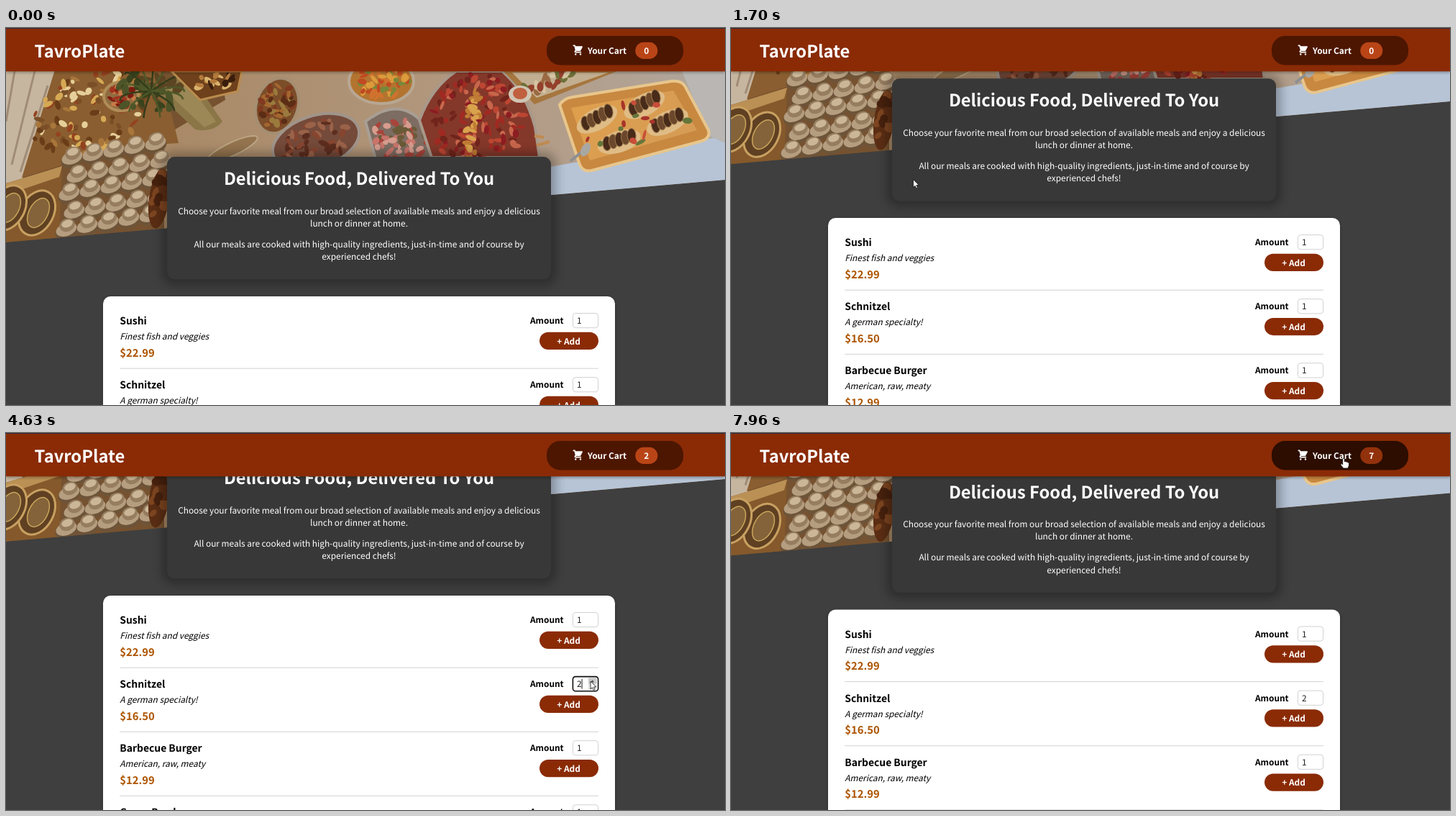
An HTML page for the animation above (8000 ms loop, 1000x524 px).

```html
<!DOCTYPE html>
<html lang="en">
<head>
<meta charset="utf-8">
<title>Meal order</title>
<style>
  html, body { margin: 0; width: 100%; height: 100%; overflow: hidden; background: #3f3f3f; }
  svg { display: block; width: 1000px; height: 524px; }
  text { font-family: "Noto Sans CJK JP", "Noto Sans CJK SC", "Noto Sans CJK", "Noto Sans", sans-serif; font-size: 11.867px; white-space: pre; text-rendering: geometricPrecision; }
  .b { font-weight: 700; }
  .i { font-style: italic; }
  .m { text-anchor: middle; }
  .h1 { font-size: 23.73px; }
  .h3 { font-size: 13.88px; }
  .price { font-size: 14.83px; }
</style>
</head>
<body>
<svg id="stage" viewBox="0 0 1000 524" xmlns="http://www.w3.org/2000/svg">
  <defs>
    <clipPath id="slant"><path d="M0 0H1000V211L0 297.8Z"/></clipPath>
    <filter id="soft" x="-20%" y="-30%" width="140%" height="160%"><feGaussianBlur stdDeviation="6.7"/></filter>
    <filter id="thin" x="-5%" y="-5%" width="110%" height="110%"><feGaussianBlur stdDeviation="2"/></filter>
    <linearGradient id="cloth"><stop offset="0" stop-color="#a98966"/><stop offset=".6" stop-color="#b39a82"/><stop offset="1" stop-color="#b0a79f"/></linearGradient>
    <linearGradient id="gold" x2="1" y2=".4"><stop offset="0" stop-color="#e0a04c"/><stop offset="1" stop-color="#d69c55"/></linearGradient>
  </defs>
</svg>
<script>
const LOOP = 8000, CARD_Y = 372.9, PITCH = 89.1;
const BROWN = '#8a2b06';
const stage = document.getElementById('stage');

function set(node, attrs) {
  for (const k in attrs) node.setAttribute(k, attrs[k]);
  return node;
}
function add(parent, tag, attrs) {
  return parent.appendChild(set(document.createElementNS('http://www.w3.org/2000/svg', tag), attrs));
}
const group = (p, attrs = {}) => add(p, 'g', attrs);
const rect = (p, x, y, width, height, fill, rx = 0, more = {}) => add(p, 'rect', { x, y, width, height, fill, rx, ...more });
const shape = (p, d, fill, more = {}) => add(p, 'path', { d, fill, ...more });
function oval(p, cx, cy, rx, ry, turn, fill, more = {}) {
  return add(p, 'ellipse', { cx, cy, rx, ry, fill, transform: `rotate(${turn} ${cx} ${cy})`, ...more });
}
function label(p, str, x, y, cls, fill) {
  const node = add(p, 'text', { x, y, class: cls, fill });
  node.textContent = str;
  return node;
}

let seed = 7;
function rnd() {
  seed = (seed * 16807) % 2147483647;
  return seed / 2147483647;
}
function scatter(p, cx, cy, rx, ry, turn, n, size, colors) {
  const g = group(p, { transform: `rotate(${turn} ${cx} ${cy})` });
  for (let i = 0; i < n; i++) {
    const a = rnd() * 6.283, r = Math.sqrt(rnd());
    oval(g, cx + rx * r * Math.cos(a), cy + ry * r * Math.sin(a),
      size * (0.6 + rnd()), size * (0.4 + rnd() * 0.5), rnd() * 180, colors[i % colors.length]);
  }
}
function dish(p, cx, cy, rx, ry, turn, fill, rim, bits, n) {
  oval(p, cx, cy, rx, ry, turn, fill, { stroke: rim, 'stroke-width': 4 });
  scatter(p, cx, cy, rx * 0.8, ry * 0.78, turn, n, 5, bits);
}

// Buffet picture
function drawBuffet(p) {
  const g = group(p, { 'clip-path': 'url(#slant)' });
  rect(g, 0, 0, 1000, 300, '#765230');
  shape(g, 'M290 0H1000V211L220 279V150L305 100Z', 'url(#cloth)');
  shape(g, 'M740 196L1000 150V212L740 236Z', '#b6c4d6');
  shape(g, 'M940 60H1000V160L978 150Z', '#b9b6b4');
  shape(g, 'M0 55H76L22 212L0 216Z', '#c6b6a0');
  shape(g, 'M12 60L0 130M40 60L8 190M58 80L20 200', 'none', { stroke: '#a08c76', 'stroke-width': 3 });

  shape(g, 'M68 58H215L240 160L160 165L22 208Z', '#8a5e30');
  scatter(g, 120, 118, 88, 54, -20, 120, 5, ['#d6a955', '#6a3d18', '#e6cf9a', '#a8763a', '#93421f', '#7a4f27']);
  dish(g, 160, 95, 24, 20, 0, '#8f6c40', '#b08c58', ['#a0341f', '#c97a48', '#7c1c10'], 22);

  shape(g, 'M0 216L78 192L74 292L0 299Z', '#85592b');
  shape(g, 'M0 216L78 192L74 207L0 232Z', '#bb9055');
  for (const [x, y] of [[43, 257], [3, 250]]) {
    oval(g, x, y, 23, 33, 28, '#5f4022', { stroke: '#c8a061', 'stroke-width': 3 });
    oval(g, x + 2, y, 13, 22, 28, '#84633a', { stroke: '#c9a55c', 'stroke-width': 1.5 });
  }
  for (let row = 0; row < 5; row++) {
    for (let col = 0; col < 5; col++) {
      const x = 92 + col * 29 + row % 2 * 9 - row * 2, y = 178 + row * 25 - col * 5;
      oval(g, x, y + 5, 16, 11, -20, '#6d5439');
      oval(g, x, y + 2, 15, 9, -20, '#b59d80');
      oval(g, x + 1, y - 4, 11, 9, -20, '#967d60');
      oval(g, x + 1, y - 6, 8, 5, -20, '#cbb797');
    }
  }
  oval(g, 213, 237, 14, 42, 8, '#5b2e14');
  scatter(g, 213, 237, 10, 36, 8, 12, 7, ['#7d4520', '#47210e']);

  shape(g, 'M205 86L254 62L301 130Q288 146 263 141Z', '#8a7647');
  shape(g, 'M222 88L250 72L292 130L276 138Z', '#9b8856');
  scatter(g, 198, 90, 45, 34, 0, 34, 7, ['#39431d', '#4d5328', '#5b4522']);
  for (let i = 0; i < 13; i++) {
    const a = i * 0.5 + 0.3, x = 202 + 46 * Math.cos(a), y = 88 + 38 * Math.sin(a);
    shape(g, `M202 88Q${x} ${y - 12} ${x} ${y}`, 'none', { stroke: i % 2 ? '#333c1a' : '#4f5829', 'stroke-width': 2.5 });
  }

  shape(g, 'M230 60H328L322 88L270 100Z', '#6e411c', { stroke: '#b98b4d', 'stroke-width': 3 });
  scatter(g, 292, 76, 28, 12, 0, 18, 5, ['#d9b36d', '#3a1d0c', '#b47a3c']);
  dish(g, 377, 108, 29, 39, 18, '#7c4d29', '#a58e72', ['#5b2d15', '#a4672f', '#803a1f', '#9a7a3d'], 44);
  dish(g, 522, 74, 45, 31, 0, '#b3742f', '#b8a792', ['#c04a22', '#dc9a3b', '#76893a', '#d0722f'], 60);
  dish(g, 431, 158, 62, 36, -18, '#744a3a', '#a0948a', ['#85452f', '#5c2d1e', '#9a6248'], 50);
  shape(g, 'M500 130Q545 95 578 130L604 186H515Z', '#7c6c61', { stroke: '#a89e94', 'stroke-width': 4 });
  scatter(g, 548, 156, 38, 30, 20, 60, 5, ['#c8746a', '#a8443b', '#d69c8e', '#6b5a38']);
  shape(g, 'M575 128Q592 82 626 60H690Q722 86 736 138L742 180H592Z', '#84382a', { stroke: '#a8988a', 'stroke-width': 4 });
  scatter(g, 655, 128, 66, 64, 0, 130, 5, ['#a02a22', '#bd4632', '#70241b', '#c8664c', '#8c1d22']);
  scatter(g, 649, 132, 9, 54, 4, 30, 5, ['#d9a24c', '#c07c34']);
  oval(g, 315, 168, 38, 9, -25, '#94744f', { stroke: '#bda684', 'stroke-width': 2 });

  shape(g, 'M690 58H855L735 106Z', '#a6763e');
  shape(g, 'M704 62H838L738 97Z', '#c2ae90');
  scatter(g, 752, 75, 38, 10, -14, 24, 6, ['#9b6a42', '#6e7038', '#d6c4a2', '#94402b']);
  oval(g, 715, 92, 16, 12, 0, '#d0c4b2');
  oval(g, 715, 91, 10, 8, 0, '#c0603f');
  shape(g, 'M735 150L748 152M738 163L756 158', 'none', { stroke: '#c08a50', 'stroke-width': 4 });

  shape(g, 'M770 107Q775 98 788 96L925 74Q940 72 945 82L977 142Q980 153 968 157L815 198Q803 201 798 190Z', '#c88840',
    { stroke: '#e8c68c', 'stroke-width': 4 });
  shape(g, 'M786 111L928 87L961 142L812 184Z', 'url(#gold)');
  for (const [x, y, turn] of [[822, 124, -28], [888, 104, -28], [853, 155, -18], [920, 128, -25]]) {
    oval(g, x, y + 3, 31, 15, turn, '#dfbc86');
    for (let k = -2; k < 3; k++) {
      const a = turn * Math.PI / 180;
      oval(g, x + k * 9 * Math.cos(a), y + k * 9 * Math.sin(a), 6, 10, turn + 15, k % 2 ? '#6b472c' : '#482b19',
        { stroke: '#9e7a4d', 'stroke-width': 1 });
    }
  }
  scatter(g, 878, 133, 78, 34, -14, 14, 5, ['#a8342a', '#65763a', '#c84d38']);
  shape(g, 'M785 185L806 168', 'none', { stroke: '#8d8f91', 'stroke-width': 4 });
  oval(g, 806, 169, 6, 10, 30, '#a9a7a2');
}

const page = group(stage);
drawBuffet(page);

rect(page, 216.6, 172.8, 548.8, 185, '#000', 17, { opacity: 0.27, filter: 'url(#soft)' });
rect(page, 224, 179.1, 534, 170.2, '#383838', 10.4);
label(page, 'Delicious Food, Delivered To You', 491, 218.2, 'b m h1', '#fff');
[['Choose your favorite meal from our broad selection of available meals and enjoy a delicious', 258.6],
 ['lunch or dinner at home.', 275.8],
 ['All our meals are cooked with high-quality ingredients, just-in-time and of course by', 304.8],
 ['experienced chefs!', 322]].forEach(([s, y]) => label(page, s, 491, y, 'm', '#fff'));

// Meal list, drawn from the top of its card
const list = group(page);
rect(list, 135, 1, 712, 385, '#000', 10.4, { opacity: 0.25, filter: 'url(#thin)' });
rect(list, 135, 0, 712, 385, '#fff', 10.4);
const items = [
  ['Sushi', 'Finest fish and veggies', '$22.99'],
  ['Schnitzel', 'A german specialty!', '$16.50'],
  ['Barbecue Burger', 'American, raw, meaty', '$12.99'],
  ['Green Bowl', 'Healthy...and green...', '$18.99']
].map(([name, info, price], i) => {
  const g = group(list, { transform: `translate(0 ${i * PITCH})` });
  label(g, name, 158.3, 39.3, 'b h3', '#000');
  label(g, info, 158.3, 60.2, 'i', '#000');
  label(g, price, 158.3, 83.7, 'b price', '#ad5502');
  rect(g, 158.3, 99.8, 665.5, 0.9, '#ccc');
  label(g, 'Amount', 729, 38.3, 'b', '#000');
  const box = rect(g, 788.4, 23.6, 35.2, 20.2, '#fff', 3.7, { stroke: '#ccc', 'stroke-width': 0.9 });
  const spin = group(g, { display: 'none' });
  rect(spin, 810, 25.5, 11.5, 16.5, '#e6e6e6');
  rect(spin, 810, 25.5, 11.5, 8.2, '#c9c9c9');
  shape(spin, 'M815.7 28.3L818 31.4H813.4ZM815.7 39.2L818 36.1H813.4Z', '#4a4a4a');
  const value = label(g, '1', 794, 38.3, '', '#222');
  const caret = rect(g, 800.6, 27, 0.9, 13.5, '#000', 0, { display: 'none' });
  const button = rect(g, 742, 49.8, 82, 24.3, BROWN, 12.15);
  label(g, '+ Add', 782.6, 66.7, 'b m', '#fff');
  return { box, spin, value, caret, button };
});

// Header
rect(stage, 0, 2, 1000, 60, '#000', 0, { opacity: 0.3, filter: 'url(#thin)' });
rect(stage, 0, 0, 1000, 60.3, BROWN);
rect(stage, 0, 0, 1000, 1, '#2b2941');
label(stage, 'TavroPlate', 39.6, 40.6, 'b h1', '#fff');
const cart = group(stage);
const cartBox = rect(cart, 752, 11, 190, 40.5, '#4d1601', 18.5);
shape(cart, 'M3 1a1 1 0 000 2h1.22l.305 1.222 1.368 5.472-.893.892C3.74 11.846 4.632 14 6.414 14H15a1 1 0 000-2H6.414l1-1H14a1 1 0 00.894-.553l3-6A1 1 0 0017 3H6.28l-.31-1.243A1 1 0 005 1zM16 16.5a1.5 1.5 0 11-3 0 1.5 1.5 0 013 0zM6.5 18a1.5 1.5 0 100-3 1.5 1.5 0 000 3z',
  '#fff', { transform: 'translate(786.8 22.7) scale(.84)' });
label(cart, 'Your Cart', 809, 36, 'b', '#fff');
const badge = rect(cart, 875.3, 19.8, 31, 23.2, '#b94517', 11.6);
const count = label(cart, '0', 890.8, 36, 'b m', '#fff');

// Pointers, both with the tip at 0,0
const pointer = group(stage, { stroke: '#111', 'stroke-width': 0.8, 'stroke-linejoin': 'round' });
const arrow = shape(pointer, 'M0 0V11L2.5 8.7L4.2 12.3L6 11.5L4.4 8H7.8Z', '#fff');
const hand = shape(pointer, 'M-1.3 1Q0 -1 1.3 1V5L2 4.5Q3.3 4.2 3.7 5.3Q5 4.7 5.6 5.9Q7.4 5.5 7.5 7.3V10L6 14H-.4L-4 9.2Q-4.2 7.3 -2.7 7.7L-1.3 9Z', '#fff');

const scrollTrack = [[1600, 0], [1630, 40], [1700, 108.5], [1770, 138], [1850, 147], [5840, 147], [5980, 127.5]];
const pointerTrack = [
  [1630, 253.5, 210.5], [1860, 253.5, 210.5], [2440, 780, 303], [2530, 777.5, 282.5], [3430, 777.5, 282.5],
  [3700, 818, 353], [3930, 813, 345], [4840, 813, 345], [5060, 785, 374], [5420, 785, 374],
  [5660, 820, 279.5], [5760, 820, 279.5], [6160, 784, 483], [7520, 784, 483], [7950, 852, 35]
];
const orders = [[2860, 1], [3220, 2], [5360, 4], [6430, 5], [6830, 6], [7230, 7]];
const bumpSteps = [[0, 1], [30, 0.9], [90, 1.1], [150, 1.15], [300, 1]];

// cubic-bezier(0, 0, .58, 1)
function easeOut(x) {
  let lo = 0, hi = 1;
  for (let i = 0; i < 20; i++) {
    const s = (lo + hi) / 2;
    if (1.74 * s * s - 0.74 * s * s * s < x) lo = s; else hi = s;
  }
  return lo * lo * (3 - 2 * lo);
}
const linear = x => x;
const smooth = x => x * x * (3 - 2 * x);

function at(track, t, ease) {
  if (t <= track[0][0]) return track[0].slice(1);
  for (let i = 1; i < track.length; i++) {
    const a = track[i - 1], b = track[i];
    if (t < b[0]) {
      const k = ease((t - a[0]) / (b[0] - a[0]));
      return a.slice(1).map((v, j) => v + (b[j + 1] - v) * k);
    }
  }
  return track[track.length - 1].slice(1);
}

function draw(t) {
  const [scroll] = at(scrollTrack, t, linear);
  set(page, { transform: `translate(0 ${-scroll})` });

  const k = t >= 800 && t < 1610 ? easeOut((t - 610) / 1000) : 1;
  set(list, { transform: `translate(0 ${CARD_Y + 35.6 * (1 - k)})`, opacity: k });

  const [x, y] = at(pointerTrack, t, smooth);
  const shown = t >= 1630;
  const over = (l, top, r, bottom) => shown && x >= l && x <= r && y >= top && y <= bottom;
  const onCart = over(752, 11, 942, 51.5);
  let onButton = onCart;

  items.forEach((item, i) => {
    const top = CARD_Y - scroll + i * PITCH;
    const hot = over(742, top + 49.8, 824, top + 74.1);
    const focus = i === 1 && t >= 4200 && t < 5200;
    onButton = onButton || hot;
    set(item.button, { fill: hot ? '#641e03' : BROWN });
    set(item.spin, { display: over(788, top + 23, 824, top + 44) ? 'inline' : 'none' });
    set(item.box, { stroke: focus ? '#101010' : '#ccc', 'stroke-width': focus ? 1.6 : 0.9 });
    set(item.caret, { display: focus && (t - 4200) % 1000 < 500 ? 'inline' : 'none' });
    item.value.textContent = i === 1 && t >= 4200 ? 2 : 1;
  });

  let total = 0, bump = 1;
  for (const [start, n] of orders) {
    if (t < start) break;
    total = n;
    [bump] = at(bumpSteps, t - start, easeOut);
  }
  count.textContent = total;
  set(cart, { transform: `translate(847 31.2) scale(${bump}) translate(-847 -31.2)` });
  set(cartBox, { fill: onCart ? '#2c0d00' : '#4d1601' });
  set(badge, { fill: onCart ? '#92320c' : '#b94517' });

  set(pointer, { transform: `translate(${x} ${y})`, display: shown ? 'inline' : 'none' });
  set(hand, { display: onButton ? 'inline' : 'none' });
  set(arrow, { display: onButton ? 'none' : 'inline' });
}

const begin = performance.now();
function tick() {
  draw((performance.now() - begin) % LOOP);
  requestAnimationFrame(tick);
}
tick();
</script>
</body>
</html>
```
